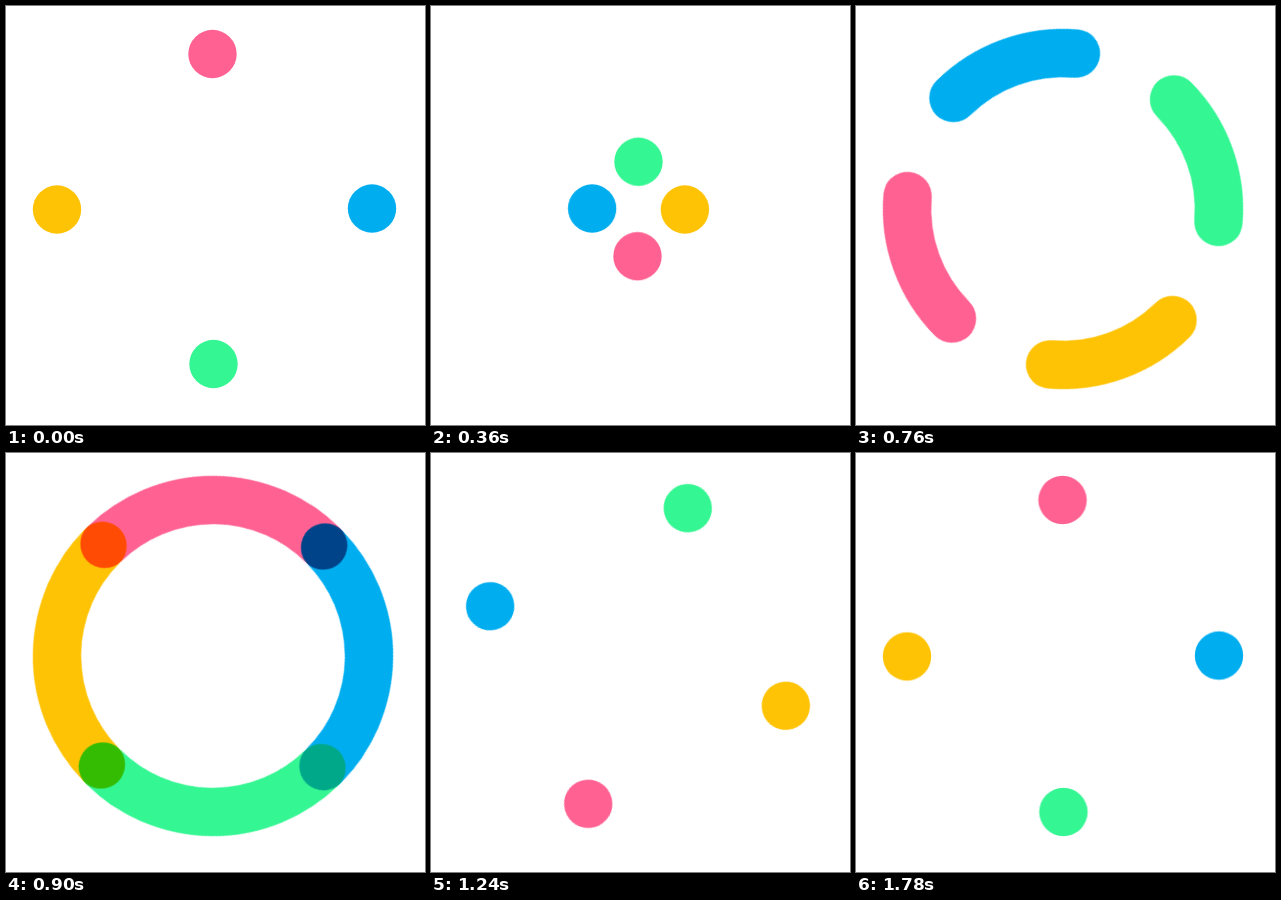
An HTML page for the animation above (1.8 s loop, 419 by 419 pixels).

```html
<!DOCTYPE html>
<html lang="en">
<head>
<meta charset="utf-8">
<title>Four dots loader</title>
<style>
  :root {
    --loop: 1800ms;
    --soft: cubic-bezier(.333, 0, .667, 1);
    --swing: cubic-bezier(.252, 0, .479, 1);
  }
  html, body {
    margin: 0;
    width: 100%;
    height: 100%;
    overflow: hidden;
    background: #fff;
  }
  svg { display: block; width: 100%; height: 100%; }

  .pink   { --c: #ff6292; }
  .yellow { --c: #ffc305; }
  .green  { --c: #34f693; }
  .blue   { --c: #00aef0; }

  /* Overlapping colours multiply */
  circle { mix-blend-mode: multiply; }

  /* Dots cross through the middle */
  .dots { animation: dots-on var(--loop) step-end infinite; }
  .dots circle { fill: var(--c); animation: cross var(--loop) var(--soft) infinite; }
  .dots .pink   { --to: 0px, 311px; }
  .dots .green  { --to: 0px, -311px; }
  .dots .yellow { --to: 312px, 0px; }
  .dots .blue   { --to: -315px, 0px; }

  /* Arcs stretch into a ring and shrink back while spinning */
  .ring { animation: ring-on var(--loop) step-end infinite; }
  .spin {
    transform-origin: 207px 203px;
    animation: spin var(--loop) var(--swing) infinite;
  }
  .ring circle {
    fill: none;
    stroke: var(--c);
    stroke-width: 48.4;
    stroke-linecap: round;
    animation: stretch var(--loop) var(--soft) infinite;
  }

  @keyframes dots-on {
    0% { visibility: visible; }
    33.5%, 100% { visibility: hidden; }
  }
  @keyframes ring-on {
    0% { visibility: hidden; }
    33.5%, 100% { visibility: visible; }
  }
  @keyframes cross {
    0% { transform: translate(0px, 0px); }
    33.333%, 100% { transform: translate(var(--to)); }
  }
  @keyframes spin {
    0%, 33.333% { transform: rotate(0deg); }
    100% { transform: rotate(540deg); }
  }
  @keyframes stretch {
    0%, 33.333% { stroke-dasharray: .01 360; }
    50% { stroke-dasharray: 89 360; }
    66.667%, 100% { stroke-dasharray: .01 360; }
  }
</style>
</head>
<body>
<svg viewBox="0 0 419 419">
  <g class="dots">
    <circle class="pink" cx="206.5" cy="48" r="24.2"/>
    <circle class="green" cx="207.5" cy="358" r="24.2"/>
    <circle class="yellow" cx="51" cy="203.5" r="24.2"/>
    <circle class="blue" cx="366" cy="202.5" r="24.2"/>
  </g>
  <g class="ring">
    <g class="spin">
      <circle class="yellow" cx="207" cy="203" r="156" pathLength="360"/>
      <circle class="pink" cx="207" cy="203" r="156" pathLength="360" transform="rotate(90 207 203)"/>
      <circle class="blue" cx="207" cy="203" r="156" pathLength="360" transform="rotate(180 207 203)"/>
      <circle class="green" cx="207" cy="203" r="156" pathLength="360" transform="rotate(270 207 203)"/>
    </g>
  </g>
</svg>
</body>
</html>
```
